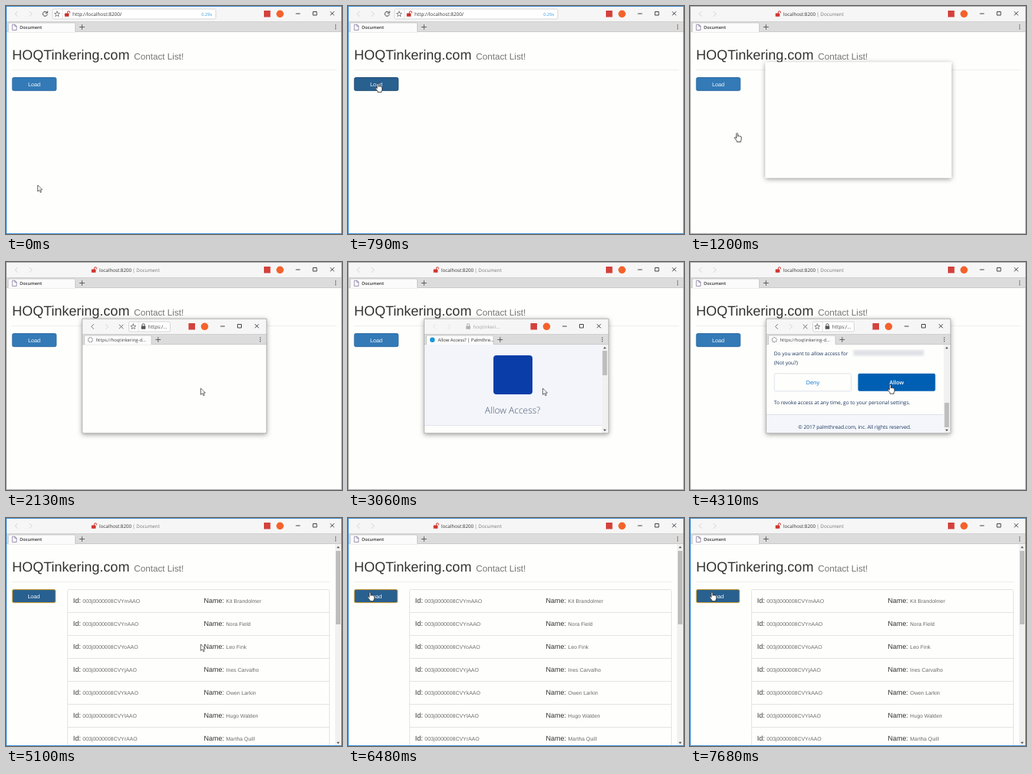
Recreate the animation shown at these times as an HTML page. Size 439 by 298 pixels, loop 8 s.

```html
<!DOCTYPE html>
<html lang="en">
<head>
<meta charset="utf-8">
<title>Contact List</title>
<style>
  html, body { margin: 0; width: 100%; height: 100%; overflow: hidden; background: #fefefc; }
  svg { display: block; }
  text { font-family: "Open Sans", sans-serif; text-rendering: geometricPrecision; white-space: pre; }
  .page text { font-family: "Liberation Sans", Arial, sans-serif; }
  .line { fill: none; stroke-linecap: round; stroke-linejoin: round; }
</style>
</head>
<body>
<svg id="stage" width="439" height="298" viewBox="0 0 439 298"></svg>
<script>
const LOOP = 8000;
const PAPER = '#fefefc';
const stage = document.getElementById('stage');
const $ = id => document.getElementById(id);

const rect = (x, y, w, h, fill, more = '') =>
  `<rect x="${x}" y="${y}" width="${w}" height="${h}" fill="${fill}" ${more}/>`;
const line = (d, color, width = 1, more = '') =>
  `<path class="line" d="${d}" stroke="${color}" stroke-width="${width}" ${more}/>`;
const text = (x, y, size, fill, str, more = '') =>
  `<text x="${x}" y="${y}" font-size="${size}" fill="${fill}" ${more}>${str}</text>`;
const group = (id, body, more = '') => `<g id="${id}" ${more}>${body}</g>`;

const lock = (x, color, open) =>
  rect(x - 2.8, 9.6, 5.6, 4.2, color, 'rx=".6"') +
  line(open ? `M${x + .8} 9.4v-1.2a1.5 1.5 0 0 1 3 0v.8`
            : `M${x - 1.6} 9.4v-1.2a1.6 1.6 0 0 1 3.2 0v1.2`, color, 1);

const star = x => {
  let d = '';
  for (let i = 0; i < 10; i++) {
    const a = (i / 5 - .5) * Math.PI, r = i % 2 ? 1.6 : 3.7;
    d += `${i ? 'L' : 'M'}${(x + r * Math.cos(a)).toFixed(2)} ${(10.6 + r * Math.sin(a)).toFixed(2)}`;
  }
  return line(d + 'Z', '#555', .7);
};

// Browser frame shared by both windows, in its own coordinates
function chrome(w) {
  return rect(0, 0, w, 20, '#f6f6f6') +
    rect(0, 20, w, 14, '#dcdcdc') +
    line(`M0 20.5H${w}`, '#cfcfcf', .8) +
    line(`M0 33.6H${w}`, '#c4c4c4', .8) +
    `<path d="M3 34V23.5q0-1.5 1.5-1.5H89q1.5 0 1.5 1.5V34Z" fill="#fbfbfb" stroke="#bdbdbd" stroke-width=".7"/>` +
    rect(3.4, 33, 86.8, 1.4, '#fbfbfb') +
    line('M99.3 24.5v6M96.3 27.5h6', '#555', .9) +
    rect(w - 102, 6, 8.5, 8.5, '#d3423c') +
    `<circle cx="${w - 81}" cy="10.3" r="4.8" fill="#f4622c"/>` +
    line(`M${w - 60} 10h5`, '#333', .9) +
    line(`M${w - 37.5} 7.5h4.5v4.5h-4.5Z`, '#333', .9) +
    line(`M${w - 15} 7.5l4.5 4.5m0-4.5l-4.5 4.5`, '#333', .9) +
    [25, 27.4, 29.8].map(y => `<circle cx="${w - 8.3}" cy="${y}" r=".7" fill="#444"/>`).join('');
}

const navArrows = (back, next) =>
  line('M15 7.4l-3 3 3 3', back, 1) + line('M31 7.4l3 3-3 3', next, 1);

const addressBox = (w, body) =>
  rect(61, 4, w, 13, '#fff', 'rx="1.5" stroke="#cfcfcf" stroke-width=".8"') +
  line('M73.6 4v13', '#d6d6d6', .7) + star(66.8) + body;

function scrollbar(x, top, bottom, thumb, size, id) {
  const mid = x + 4;
  return rect(x, top, 8, bottom - top, '#f1f1f1') +
    rect(x + 1, thumb, 6, size, '#bdbdbd', `id="${id}"`) +
    `<path d="M${mid - 2} ${top + 5.2}h4l-2-2.4ZM${mid - 2} ${bottom - 5.2}h4l-2 2.4Z" fill="#555"/>`;
}

const people = [
  ['m', 'Kit Brandolmer'], ['n', 'Nora Field'], ['o', 'Leo Fink'], ['j', 'Ines Carvalho'],
  ['k', 'Owen Larkin'], ['l', 'Hugo Walden'], ['r', 'Martha Quill']
];
const rows = people.map(([key, name], i) => {
  const y = 111.4 + i * 30;
  return text(87.8, y, 9, '#333', 'Id:') +
    text(100.3, y, 6.95, '#6c6c6c', `003j0000008CVY${key}AAO`) +
    text(258.4, y, 9, '#333', 'Name:') +
    text(287.6, y, 6.95, '#6c6c6c', name) +
    line(`M80.5 ${123.5 + i * 30}H422.5`, '#ddd', .8);
}).join('');

const mainWindow =
  rect(0, 0, 439, 298, PAPER) + chrome(439) +
  navArrows('#d2d2d2', '#d2d2d2') +
  line('M8.6 24.3h3.2l2 2v5.2h-5.2ZM11.6 24.5v2h2', '#7a6a99', .7) +
  text(18, 30.2, 5.75, '#333', 'Document', 'font-weight="600"') +
  group('address',
    line('M53.6 8.6a3 3 0 1 0 .4 2.6M54.2 6.9v2.3h-2.3', '#444', 1) +
    addressBox(213, lock(79.5, '#c9302c', true) +
      text(87, 12.8, 6.4, '#333', 'http://localhost:8200/') +
      text(255.3, 12.8, 5.7, '#3b9fe0', '0.29s'))) +
  group('heading',
    lock(114.5, '#d0342c', true) +
    text(122, 13, 6.25, '#333', 'localhost:8200') +
    text(165.3, 13, 6.25, '#777', '| Document')) +
  group('page',
    text(8, 70, 18, '#333', 'HOQTinkering.com') +
    text(167.3, 70, 11.7, '#777', 'Contact List!') +
    line('M8 83.5H432', '#eaeaea', .8, 'id="rule"') +
    `<rect id="load" x="8.3" y="93.6" height="17" rx="2" stroke-width="1"/>` +
    text(37, 104.6, 7.1, '#fff', 'Load', 'id="loadText" text-anchor="middle"') +
    group('list',
      rect(80.5, 93.5, 342, 220, PAPER, 'rx="2" stroke="#ddd" stroke-width=".8"') + rows +
      scrollbar(430, 34, 298, 43, 96, 'mainThumb')), 'class="page"') +
  `<rect id="edge" x=".5" y=".5" width="438" height="297" fill="none"/>`;

const navy = '#16325c';
const consent =
  rect(0, 0, 232, 400, PAPER) +
  rect(0, 0, 232, 105, '#f4f5fb') + line('M0 105.5H232', '#d8dde6', .8) +
  rect(90.5, 14, 51, 51, '#0a3da8', 'rx="4" id="appMark"') +
  text(115.6, 90, 12, '#44566f', 'Allow Access?', 'text-anchor="middle" font-weight="300"') +
  `<g transform="translate(0 246)">` +
  text(10.3, 14, 6.6, navy, 'Do you want to allow access for') +
  rect(114, 7, 92, 7.5, '#dfe1e6', 'filter="url(#soft)"') +
  text(10.3, 26, 6.6, navy, '(Not you?)') +
  rect(10.7, 37.8, 100.5, 23, PAPER, 'rx="2" stroke="#d8dde6" stroke-width=".8"') +
  text(61, 51.8, 7.2, '#0070d2', 'Deny', 'text-anchor="middle"') +
  rect(120, 37.8, 101, 23, '#0070d2', 'rx="2" id="allow"') +
  text(170.5, 51.8, 7.2, '#fff', 'Allow', 'text-anchor="middle" font-weight="600"') +
  text(10.3, 77.6, 6.6, navy, 'To revoke access at any time, go to your personal settings.') +
  rect(0, 91, 232, 26, '#f4f6fb') + line('M0 91.5H232', '#d8dde6', .8) +
  text(115.5, 110, 6.6, navy, '© 2017 palmthread.com, inc. All rights reserved.', 'text-anchor="middle"') +
  `</g>`;

const popup =
  rect(0, 0, 241, 150, PAPER, 'filter="url(#shadow)"') +
  group('popChrome',
    chrome(241) +
    group('popLoading',
      navArrows('#777', '#d2d2d2') +
      line('M48.6 8l5 5m0-5l-5 5', '#666', .9) +
      addressBox(54, lock(80, '#555') + text(86.3, 12.8, 6.4, '#444', 'https:/...')) +
      `<circle id="spinner" cx="10.7" cy="27.7" r="3" fill="none" stroke="#777" stroke-width="1" stroke-dasharray="1.5 .85"/>` +
      text(18, 30, 5.9, '#444', 'https://hoqtinkering-d...')) +
    group('popReady',
      group('popHeading', navArrows('#d2d2d2', '#d2d2d2') + lock(57.6, '#888') +
        text(64, 12.8, 6.25, '#777', 'hoqtinkeri...')) +
      `<circle cx="10.7" cy="27.7" r="3.2" fill="#1798d8"/>` +
      text(18, 30, 5.9, '#333', 'Allow Access? | Palmthre...')) +
    group('popPage',
      `<svg x="0" y="34" width="232" height="116">${group('scroll', consent)}</svg>` +
      scrollbar(232, 34, 150, 42, 32, 'popThumb')) +
    rect(.2, .2, 240.6, 149.6, 'none', 'stroke="#a8a8a8" stroke-width=".8"'));

stage.innerHTML =
  `<defs>
    <filter id="shadow" x="-10%" y="-10%" width="120%" height="125%">
      <feDropShadow dx="0" dy="1.5" stdDeviation="3" flood-opacity=".4"/></filter>
    <filter id="soft"><feGaussianBlur stdDeviation="1.4"/></filter>
  </defs>` + mainWindow + group('popup', popup) +
  group('arrow', `<path d="M0 0v8.4l2-1.8 1.4 3.1 1.4-.6-1.4-3h2.6Z" fill="#fff" stroke="#333" stroke-width=".7"/>`) +
  group('hand', `<path d="M-1 .8q1-1.5 2 0v3.6l.4-.5q1-.6 1.5.3 1-.6 1.5.4 1.2-.4 1.2.9v2.6q0 1.2-.8 2.2v1.4h-5v-1.3l-3-3.7q-.4-1.2 1-1.1l1.2 1.2Z" fill="#fff" stroke="#222" stroke-width=".8" stroke-linejoin="round"/>`);

// Pointer path: time, x, y
const path = [
  [0, 41.5, 234], [310, 41.5, 234], [690, 39, 101], [960, 39, 101], [1200, 61.5, 166],
  [1850, 254.5, 165], [3370, 254.5, 165], [3560, 261.5, 160.5], [4580, 261.5, 160.5],
  [4760, 254.5, 165], [5120, 254.5, 165], [5270, 205, 176], [5660, 28.8, 97], [LOOP, 28.8, 97]
];
const clamp = v => Math.max(0, Math.min(1, v));
const ramp = (t, a, b) => clamp((t - a) / (b - a));
const ease = v => v * v * (3 - 2 * v);
const between = (t, a, b) => t >= a && t < b;

function pointer(t) {
  const i = path.findIndex(p => p[0] > t);
  const [a, x, y] = path[i - 1], [b, u, v] = path[i];
  const k = ease((t - a) / (b - a));
  return [x + (u - x) * k, y + (v - y) * k];
}

const show = (id, on) => $(id).style.display = on ? '' : 'none';
const set = (id, attrs) => { for (const k in attrs) $(id).setAttribute(k, attrs[k]); };

function render(t) {
  const open = between(t, 1080, 4560);
  const active = !open;
  const [x, y] = pointer(t);
  const overLoad = !open && x > 8 && x < 66 && y > 93 && y < 111;
  const pressed = between(t, 860, 960) || between(t, 6000, 6100) || between(t, 7200, 7310);
  const listed = t >= 4900 && !between(t, 6100, 6480) && !between(t, 7310, 7680);
  const focused = active && t >= 860;

  // Main window
  show('address', t < 880);
  show('heading', t >= 880);
  set('heading', { opacity: ramp(t, 880, 1000) });
  set('edge', { stroke: active ? '#4a94d6' : '#ababab' });
  show('list', listed);
  set('rule', { d: `M8 83.5H${listed ? 423 : 432}` });
  const dark = overLoad || focused;
  set('load', {
    width: listed ? 56.4 : 57.4,
    fill: pressed ? '#204d74' : dark ? '#286090' : '#337ab7',
    stroke: focused ? '#c9962c' : dark ? '#204d74' : '#2e6da4'
  });
  set('loadText', { x: listed ? 36.3 : 37 });

  // Popup
  show('popup', open);
  if (open) {
    const grow = ease(ramp(t, 1080, 1190)), close = ramp(t, 4460, 4560);
    const scale = .92 + .088 * grow - .008 * ramp(t, 1300, 1400) - .06 * close;
    set('popup', {
      transform: `translate(220 149) scale(${scale}) translate(-120.5 -75)`,
      opacity: grow * (1 - close)
    });
    const ready = between(t, 2700, 3620);
    show('popChrome', t >= 1400);
    show('popLoading', !ready);
    show('popReady', ready);
    set('popHeading', { opacity: .5 + .5 * ramp(t, 3000, 3250) });
    show('popPage', t >= 2560);
    show('appMark', t >= 2640);
    set('spinner', { transform: `rotate(${t * .36 % 360} 10.7 27.7)` });
    const k = ease(ramp(t, 3080, 3340));
    set('scroll', { transform: `translate(0 ${-246 * k})` });
    set('popThumb', { y: 42 + 68 * k });
    set('allow', { fill: t >= 3370 ? '#005fb2' : '#0070d2' });
  }

  // Pointer
  const hand = overLoad || between(t, 960, 1330) || between(t, 3370, 4560);
  show('hand', hand);
  show('arrow', !hand);
  set(hand ? 'hand' : 'arrow', { transform: `translate(${x.toFixed(2)} ${y.toFixed(2)})` });
}

const start = performance.now();
function tick() {
  render((performance.now() - start) % LOOP);
  requestAnimationFrame(tick);
}
tick();
</script>
</body>
</html>
```
